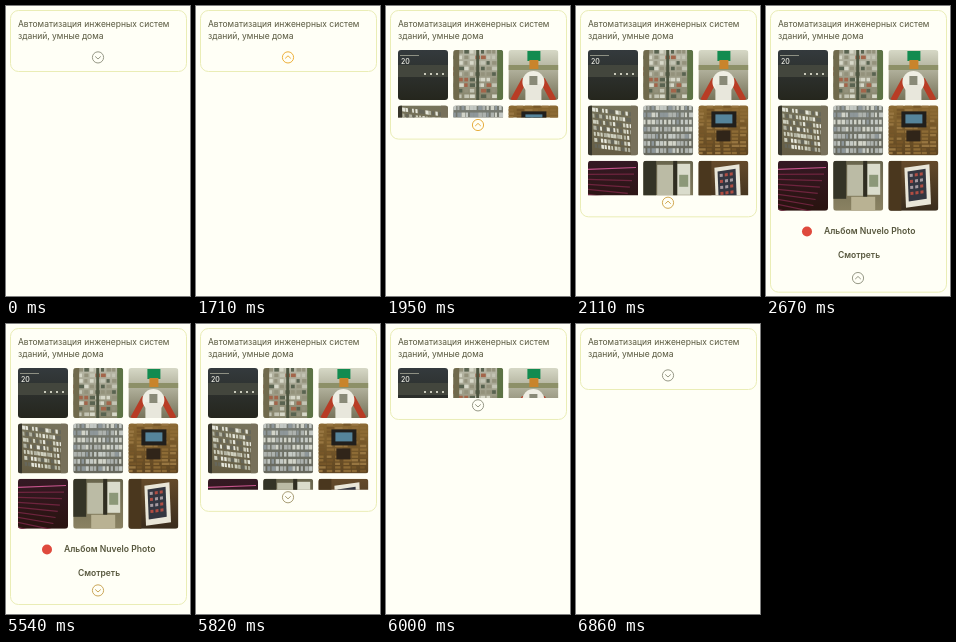
Recreate the animation shown at these times as an HTML page with a canvas. Size 184 by 290 pixels, loop 8.27 s.

```html
<!DOCTYPE html>
<html lang="ru">
<head>
<meta charset="utf-8">
<style>
html, body { margin: 0; width: 100%; height: 100%; overflow: hidden; background: #fffff6; }
canvas { display: block; width: 184px; height: 290px; }
</style>
</head>
<body>
<canvas id="stage"></canvas>
<script>
const W = 184, H = 290, LOOP = 8270;
const CLOSED = 66, OPEN = 288;
const PAPER = '#fffff6', INK = '#57573d';
const FONT = 'Inter, "Open Sans", sans-serif';
const GREY = [151, 153, 135], AMBER = [238, 176, 58];
const canvas = document.getElementById('stage');
const ctx = canvas.getContext('2d');
const dpr = window.devicePixelRatio || 1;
canvas.width = W * dpr;
canvas.height = H * dpr;

const clamp = v => Math.max(0, Math.min(1, v));
const quart = v => v < 0.5 ? 8 * v ** 4 : 1 - 8 * (1 - v) ** 4;
const span = (t, from, to) => clamp((t - from) / (to - from));
const rise = (t, from, to) => {
  const v = span(t, from, to);
  return v * v * (3 - 2 * v);
};

function random(seed) {
  return () => (seed = seed * 16807 % 2147483647) / 2147483647;
}

function rect(x, y, w, h, color) {
  ctx.fillStyle = color;
  ctx.fillRect(x, y, w, h);
}

function circle(x, y, r, color) {
  ctx.fillStyle = color;
  ctx.beginPath();
  ctx.arc(x, y, r, 0, Math.PI * 2);
  ctx.fill();
}

function label(str, x, y, size, weight, color) {
  ctx.font = `${weight} ${size}px ${FONT}`;
  ctx.fillStyle = color;
  ctx.fillText(str, x, y);
}

function fade(top, bottom) {
  const g = ctx.createLinearGradient(0, 0, 0, 50);
  g.addColorStop(0, top);
  g.addColorStop(1, bottom);
  rect(0, 0, 50, 50, g);
}

// Rows of small random parts over the whole photo.
function rack(rnd, rows, colors, cols = 12) {
  const w = 50 / cols, h = 50 / rows;
  for (let i = 0; i < rows * cols; i++) {
    const color = colors[Math.floor(rnd() * colors.length)];
    rect(i % cols * w, Math.floor(i / cols) * h, w * (0.5 + rnd() / 2), h * 0.65, color);
  }
}

// Each photo is painted in a 50 x 50 box.
const photos = [
  rnd => {
    fade('#343a3d', '#25261d');
    rect(0, 15, 50, 12, '#43463d');
    rect(2, 5, 19, 0.8, '#a5a797');
    label('20', 3, 14, 7, 500, '#f2f2e8');
    for (let x = 26; x < 48; x += 6) rect(x, 23, 2, 2, '#c8c9ba');
  },
  rnd => {
    fade('#b9b9a8', '#85836a');
    rack(rnd, 9, ['#d6d7c8', '#c3c4b4', '#596350', '#94927c', '#a3654a'], 9);
    rect(0, 0, 6, 50, '#706a4c');
    rect(23, 0, 3, 50, '#4d5540');
    rect(44, 0, 6, 50, '#5d7345');
  },
  rnd => {
    fade('#d6d8c6', '#77735a');
    rect(0, 15, 50, 5, '#8d9068');
    rect(19, 1, 13, 10, '#128b50');
    rect(21, 10, 9, 9, '#c8842c');
    for (const side of [-1, 1]) {
      ctx.save();
      ctx.translate(25 + side * 14, 39);
      ctx.rotate(side * -0.5);
      rect(-3, -11, 6, 24, '#b83c25');
      ctx.restore();
    }
    circle(25, 32, 11, '#efeee4');
    rect(17, 34, 16, 16, '#e8e7dc');
    rect(21, 26, 8, 9, '#898a78');
  },
  rnd => {
    fade('#77745c', '#655c43');
    ctx.save();
    ctx.transform(0.8, 0.1, 0.06, 0.85, 4, 2);
    rack(rnd, 7, ['#e6e7dc', '#cecfbe', '#b1b2a1', '#66665a']);
    ctx.restore();
    rect(0, 0, 4, 50, '#37352a');
    rect(43, 0, 7, 50, '#77705a');
  },
  rnd => {
    fade('#777b72', '#66675b');
    rack(rnd, 7, ['#c4c9c4', '#adb2ae', '#8e979a', '#d2d4c9']);
  },
  rnd => {
    fade('#8b6a32', '#5d4421');
    rack(rnd, 14, ['#8d6b35', '#765628', '#987641'], 6);
    rect(13, 6, 25, 16, '#211f1c');
    rect(17, 9, 17, 9, '#55849b');
    rect(18, 25, 14, 11, '#302519');
  },
  rnd => {
    fade('#351924', '#29130f');
    for (let i = 0; i < 9; i++) {
      ctx.save();
      ctx.translate(0, 8 + i * 5);
      ctx.rotate(i * 0.035 - 0.04);
      rect(0, 0, 48 - i * 2, 1.2, i ? '#6e243e' : '#c5548c');
      ctx.restore();
    }
  },
  rnd => {
    fade('#68654d', '#8a8262');
    rect(0, 0, 13, 38, '#343426');
    rect(14, 4, 16, 31, '#bbbba5');
    rect(34, 3, 13, 31, '#dadccc');
    rect(30, 0, 4, 40, '#302e22');
    rect(36, 14, 9, 12, '#8c9878');
    rect(18, 36, 24, 14, '#b9b293');
  },
  rnd => {
    fade('#654b2b', '#392c1c');
    rect(0, 0, 13, 50, '#4a371e');
    ctx.save();
    ctx.transform(1, -0.14, 0.04, 1, 16, 7);
    rect(0, 0, 25, 40, '#e9e6d8');
    rect(3, 4, 18, 30, '#333640');
    for (let i = 0; i < 12; i++) {
      const color = rnd() < 0.5 ? '#a59aa0' : '#b04d43';
      rect(5 + i % 3 * 5, 7 + Math.floor(i / 3) * 6, 3, 3, color);
    }
    ctx.restore();
  }
];

function drawPhoto(paint, i) {
  ctx.save();
  ctx.translate(12 + i % 3 * 55.2, 44 + Math.floor(i / 3) * 55.4);
  ctx.beginPath();
  ctx.roundRect(0, 0, 50, 50, 3);
  ctx.clip();
  paint(random(i * 97 + 11));
  ctx.restore();
}

function bottomAt(t) {
  const open = 1 - Math.exp(-((Math.max(0, t - 1790) / 308.6) ** 1.557));
  const shut = quart(span(t, 5245, 6427));
  return CLOSED + (OPEN - CLOSED) * open * (1 - shut);
}

function drawArrow(t, bottom) {
  const turn = rise(t, 650, 1120) - rise(t, 5210, 5530);
  const glow = rise(t, 650, 1120) - rise(t, 1810, 2600)
    + 0.6 * (rise(t, 5210, 5500) - rise(t, 5540, 6000));
  ctx.save();
  ctx.translate(92, bottom - 14.6);
  ctx.rotate(Math.PI * turn);
  ctx.strokeStyle = `rgb(${GREY.map((v, i) => v + (AMBER[i] - v) * glow)})`;
  ctx.lineWidth = 1;
  ctx.beginPath();
  ctx.arc(0, 0, 5.6, 0, Math.PI * 2);
  ctx.moveTo(-2.8, -1);
  ctx.lineTo(0, 1.6);
  ctx.lineTo(2.8, -1);
  ctx.stroke();
  ctx.restore();
}

function draw(t) {
  const bottom = bottomAt(t);
  ctx.setTransform(dpr, 0, 0, dpr, 0, 0);
  rect(0, 0, W, H, PAPER);

  ctx.strokeStyle = '#eaedb6';
  ctx.lineWidth = 1;
  ctx.beginPath();
  ctx.roundRect(4.5, 4.5, 176, bottom - 5, 8);
  ctx.stroke();

  label('Автоматизация инженерных систем', 12, 21.3, 8.5, 400, INK);
  label('зданий, умные дома', 12, 33.3, 8.5, 400, INK);

  ctx.save();
  ctx.beginPath();
  ctx.rect(5, 44, 175, bottom - CLOSED);
  ctx.clip();
  photos.forEach(drawPhoto);
  circle(41, 225.5, 5, '#df4a3d');
  label('Альбом Nuvelo Photo', 58, 228.3, 8.6, 600, INK);
  label('Смотреть', 72, 252.3, 8.5, 600, INK);
  ctx.restore();

  drawArrow(t, bottom);
}

const start = performance.now();
function tick(now) {
  draw(Math.max(0, now - start) % LOOP);
  requestAnimationFrame(tick);
}
draw(0);
requestAnimationFrame(tick);
</script>
</body>
</html>
```
